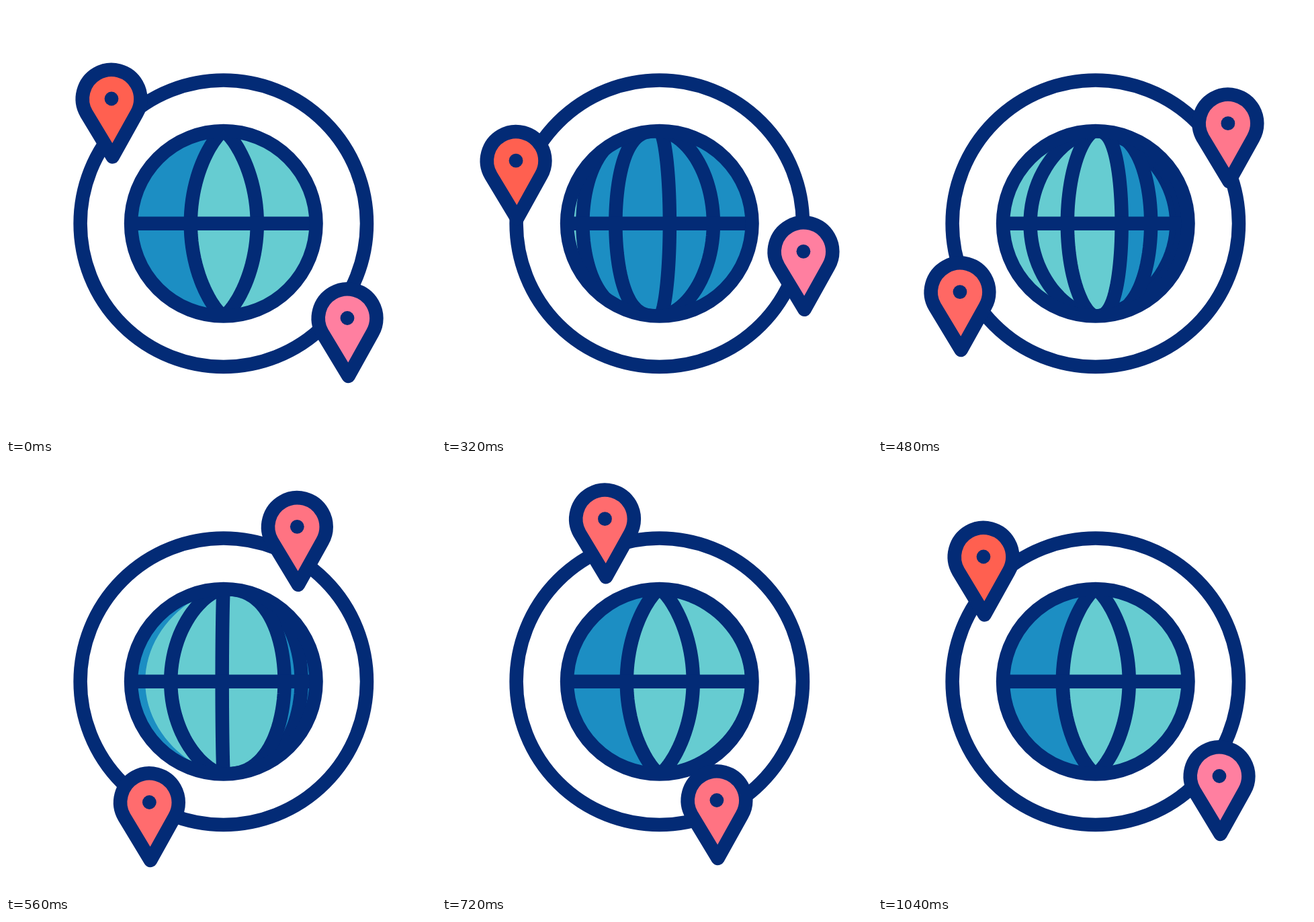
Recreate the animation shown at these times as an HTML page with a canvas. Size 640 by 640 pixels, loop 2 s.

```html
<!DOCTYPE html>
<html lang="en">
<head>
<meta charset="utf-8">
<title>Globe with orbiting pins</title>
<style>
html, body { margin: 0; width: 100%; height: 100%; overflow: hidden; background: #fff; }
canvas { display: block; width: 640px; height: 640px; }
</style>
</head>
<body>
<canvas id="stage" width="640" height="640"></canvas>
<script>
const ctx = document.getElementById('stage').getContext('2d');
const NAVY = '#032b76', LIGHT = '#66ccd1', DARK = '#1c8ec3';
const RED = [255, 96, 80], PINK = [255, 127, 160];
const LOOP = 2000, FRAME = 40, SPIN = 720, TRAVEL = 1040;
const MID = 323.8, R = 137.75, EDGE = 138, LINE = 20.5;
const WEST = -49, EAST = 50;

const clamp = (v, lo, hi) => Math.min(hi, Math.max(lo, v));
const easeIn = n => p => p ** n;
const easeOut = n => p => 1 - (1 - p) ** n;
const easeBoth = n => p => p ** n / (p ** n + (1 - p) ** n);

// A meridian's offset from the axis moves between two values;
// a higher taper makes it more pointed at the poles
const meridian = (from, to, start, end, ease, taper = 0.78) =>
  ({ from, to, start, end, ease, taper });

const rear = meridian(-EDGE, EDGE, 300, SPIN, easeOut(1.83), 0.54);
const meridians = [
  meridian(WEST, EDGE, 0, 500, easeIn(2.4)),
  meridian(EAST, EDGE, 0, 500, easeIn(2.4)),
  meridian(-EDGE, EDGE, 272, 800, easeOut(3.2), 0.54),
  rear,
  meridian(-EDGE, EAST, 320, SPIN, easeOut(1.4)),
  meridian(-EDGE, WEST, 320, SPIN, easeOut(1.2))
];

// Borders repaint everything to their left, in order
const borders = [
  { color: DARK, edge: meridian(WEST, 200, 0, 372, easeIn(1)) },
  { color: LIGHT, edge: rear },
  { color: DARK, edge: meridian(-EDGE, WEST, 490, SPIN, easeIn(1.2)) }
];

function track(d) {
  const path = document.createElementNS('http://www.w3.org/2000/svg', 'path');
  path.setAttribute('d', d);
  return path;
}

const pins = [
  {
    path: track('M157 138 C121 162 99.5 252 99.5 318 S193 519.5 318 519.5 S460 483 508 464.5'
      .replace('S193', 'C99.5 468 193').replace('S460', 'C368 519.5 460')),
    from: RED, to: PINK
  },
  {
    path: track('M508 464.5 C528 418 548.5 335 548.5 279 C548.5 144 431 68 332 68 C282 68 205 80 157 138'),
    from: PINK, to: RED
  }
];

const travel = easeBoth(2.2);

function offset(m, t) {
  const p = clamp((t - m.start) / (m.end - m.start), 0, 1);
  return m.from + (m.to - m.from) * m.ease(p);
}

function circle(x, y, r) {
  ctx.beginPath();
  ctx.arc(x, y, r, 0, 2 * Math.PI);
}

// Pole to pole; the curve swells while the globe spins
function traceMeridian(m, t) {
  const d = offset(m, t);
  const q = m.taper - 0.22 * Math.sin(Math.PI * clamp(t / SPIN, 0, 1));
  const n = 48;
  ctx.beginPath();
  for (let i = 0; i <= n; i++) {
    const a = Math.PI * (i / n - 0.5);
    ctx.lineTo(MID + d * Math.max(0, Math.cos(a)) ** (2 * q), MID + R * Math.sin(a));
  }
}

function drawGlobe(t) {
  ctx.save();
  circle(MID, MID, R);
  ctx.clip();
  ctx.fillStyle = LIGHT;
  ctx.fill();
  for (const { color, edge } of borders) {
    if (t < edge.start) continue;
    traceMeridian(edge, t);
    ctx.arc(MID, MID, R, Math.PI / 2, 1.5 * Math.PI);
    ctx.fillStyle = color;
    ctx.fill();
  }
  for (const m of meridians) {
    if (Math.abs(offset(m, t)) >= EDGE) continue;
    traceMeridian(m, t);
    ctx.stroke();
  }
  ctx.restore();
  ctx.beginPath();
  ctx.moveTo(MID - R, MID);
  ctx.lineTo(MID + R, MID);
  ctx.stroke();
  circle(MID, MID, R);
  ctx.stroke();
}

function drawPin({ path, from, to }, t) {
  const s = travel(clamp(t / TRAVEL, 0, 1));
  const pos = path.getPointAtLength(s * path.getTotalLength());
  const k = clamp((t - 320) / 640, 0, 1);
  const rgb = from.map((v, i) => Math.round(v + (to[i] - v) * k));
  ctx.save();
  ctx.translate(pos.x, pos.y);
  ctx.beginPath();
  ctx.arc(0.1, 0.2, 43.3, Math.PI * 5 / 6, Math.PI / 6);
  ctx.lineTo(1.6, 86.5);
  ctx.closePath();
  ctx.fillStyle = `rgb(${rgb})`;
  ctx.fill();
  ctx.stroke();
  circle(0, 0, 10.4);
  ctx.fillStyle = NAVY;
  ctx.fill();
  ctx.restore();
}

function draw(now) {
  const t = Math.floor((now % LOOP) / FRAME) * FRAME;
  ctx.fillStyle = '#fff';
  ctx.fillRect(0, 0, 640, 640);
  ctx.strokeStyle = NAVY;
  ctx.lineWidth = LINE;
  ctx.lineJoin = 'round';
  circle(MID, MID, 213.2);
  ctx.stroke();
  drawGlobe(t);
  for (const pin of pins) drawPin(pin, t);
}

const start = performance.now();
function tick() {
  draw(performance.now() - start);
  requestAnimationFrame(tick);
}
tick();
</script>
</body>
</html>
```
